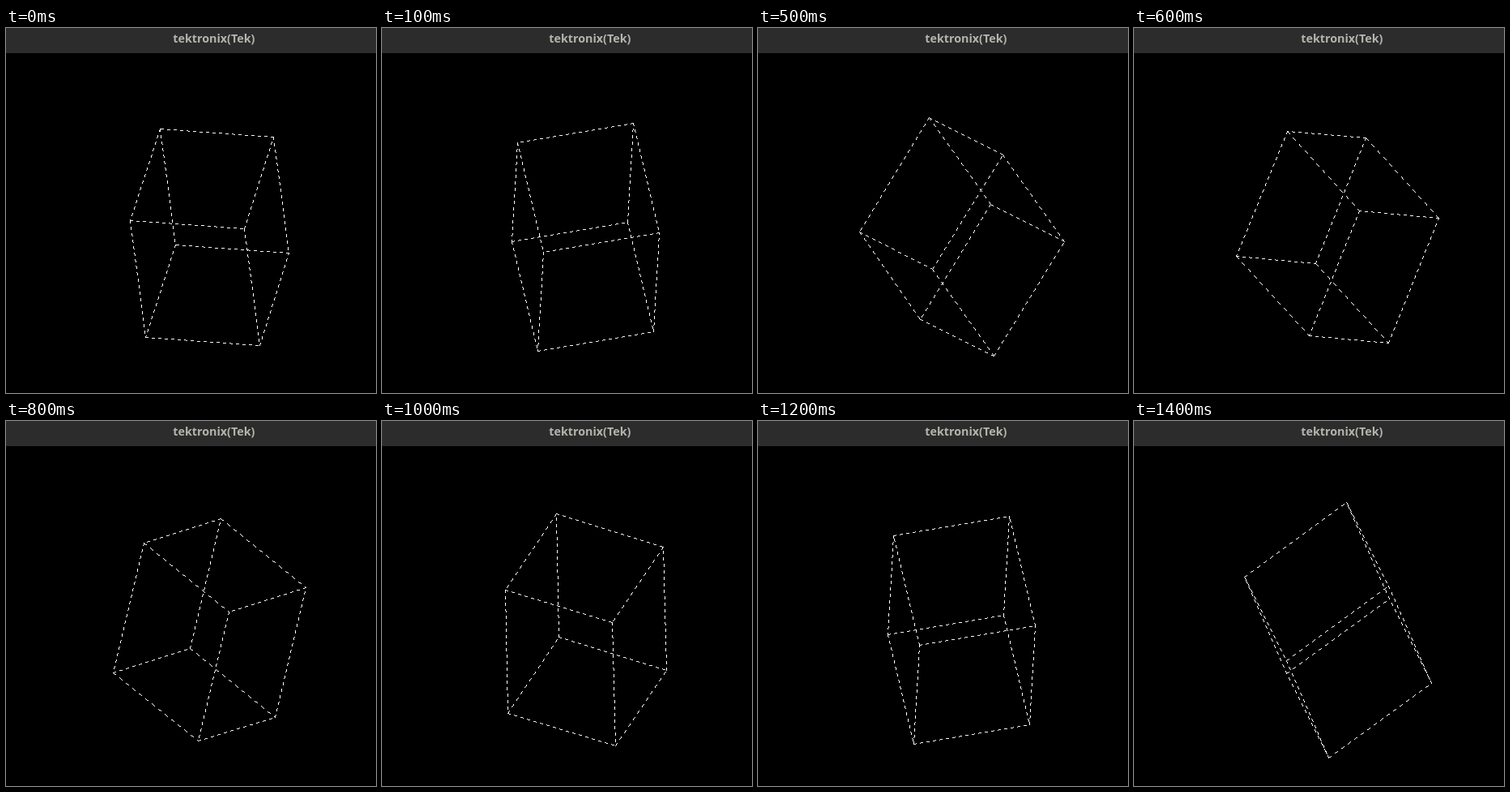
Animation, 457 px wide and 450 px high, one loop 1500 ms. Source, as an HTML page with a canvas:

```html
<!DOCTYPE html>
<html lang="en">
<head>
<meta charset="utf-8">
<title>Rotating cube</title>
<style>
  html, body { margin: 0; width: 100%; height: 100%; overflow: hidden; background: #000; }
  canvas, svg { position: absolute; left: 0; top: 0; display: block; }
  text { font: bold 14.3px "Open Sans", "Noto Sans", sans-serif; fill: #b4b4ae; text-anchor: middle; }
</style>
</head>
<body>
<canvas id="view" width="457" height="450"></canvas>
<svg width="457" height="31">
  <rect width="457" height="31" fill="#2c2c2c"/>
  <text x="256.8" y="18">tektronix(Tek)</text>
</svg>
<script>
const ctx = document.getElementById('view').getContext('2d');
const LOOP = 1500, TICK = 100;
const CX = 251.2, CY = 257.3, SX = 146.6, SY = 183.2;
const rad = d => d * Math.PI / 180;
const TILT = Math.cos(rad(41.9)), LEAN = Math.sin(rad(41.9));

// Projected cube axes: one axis precesses about the view line, the cube spins around it.
function axes(step) {
  const turn = rad(112 - 18 * step), spin = rad(-114.5 + 9 * step);
  const c = Math.cos(turn), s = Math.sin(turn);
  const mix = (p, q) => [SX * (p * c - q * s), SY * (p * s + q * c)];
  return [
    mix(TILT * Math.cos(spin), Math.sin(spin)),
    mix(LEAN, 0),
    mix(-TILT * Math.sin(spin), Math.cos(spin))
  ];
}

function corner(ax, signs) {
  const at = (mid, i) => Math.round(ax.reduce((sum, v, k) => sum + signs[k] * v[i] / 2, mid));
  return [at(CX, 0), at(CY, 1)];
}

// Hard-edged one pixel line, four pixels on and four off along its longer direction.
function dashed([x0, y0], [x1, y1]) {
  const dx = x1 - x0, dy = y1 - y0;
  const n = Math.max(Math.abs(dx), Math.abs(dy)) || 1;
  for (let i = 0; i <= n; i++) {
    if (i % 8 < 4) ctx.fillRect(Math.round(x0 + dx * i / n), Math.round(y0 + dy * i / n), 1, 1);
  }
}

const RING = [[-1, -1], [-1, 1], [1, 1], [1, -1]];

function draw(step) {
  ctx.fillStyle = '#000';
  ctx.fillRect(0, 0, 457, 450);
  ctx.fillStyle = '#fff';
  const ax = axes(step);
  const [back, front] = [-1, 1].map(z => RING.map(p => corner(ax, [...p, z])));
  for (let i = 0; i < 4; i++) {
    const next = (i + 1) % 4;
    dashed(back[i], back[next]);
    dashed(front[i], front[next]);
    dashed(back[i], front[i]);
  }
}

let shown = -1;
const start = performance.now();
function frame() {
  const tick = Math.floor((performance.now() - start) % LOOP / TICK);
  const step = tick < 7 ? tick : tick - 1; // the pose rests for one extra tick at 600 ms
  if (step !== shown) draw(shown = step);
  requestAnimationFrame(frame);
}
frame();
</script>
</body>
</html>
```
